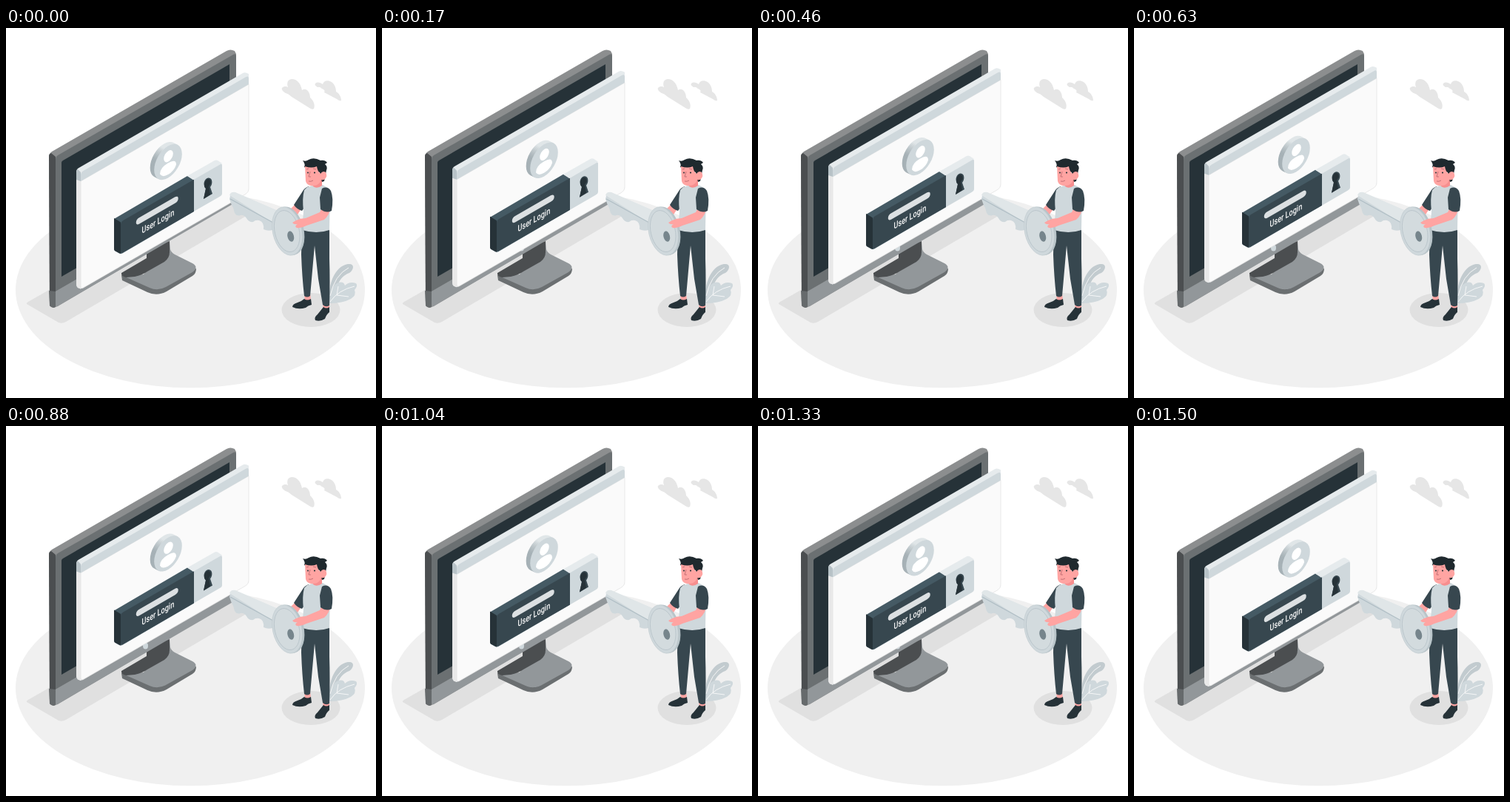
An HTML page that plays this animation: 500x500 px, repeating every 1.54 s.

```html
<!DOCTYPE html>
<html lang="en">
<head>
<meta charset="utf-8">
<title>User login</title>
<style>
html, body { margin: 0; width: 100%; height: 100%; overflow: hidden; background: #fff; }
svg { display: block; width: 100%; height: 100%; }
text { font: 500 12.5px Roboto, sans-serif; fill: #fafafa; }
.skin { fill: #ffa4a2; }
</style>
</head>
<body>
<svg viewBox="0 0 500 500">
  <linearGradient id="rim">
    <stop offset=".1" stop-color="#a6b1b6"/>
    <stop offset=".4" stop-color="#e0e6e8"/>
  </linearGradient>

  <!-- floor and shadows -->
  <ellipse cx="249" cy="354" rx="236" ry="132.300" fill="#f0f0f0"/>
  <path d="M28 373Q27 372 30 370L282 226 328 252 81 397Q76 400 71 398Z" fill="#e0e0e0"/>
  <ellipse cx="412" cy="381" rx="39.500" ry="23" fill="#e0e0e0"/>

  <g id="clouds" fill="#e6e6e6">
    <path d="M373 81C376 78 379 79 381 80C378 71 384 67 391 70C397 73 399 79 400 84C406 80 411 87 411 94C416 98 418 105 416 109Q414 111 410 108L386 93Q382 89 378 88C374 86 372 83 373 81Z"/>
    <path d="M418 75C421 72 425 74 428 76C429 71 435 70 440 73C444 76 446 81 446 86C450 88 453 93 453 98Q451 99 447 96L430 87Q432 84 427 82Q424 79 421 80Q416 77 418 75Z"/>
  </g>

  <g id="stand">
    <path d="M156 334L157 341 191 357Q204 363 217 356L252 335Q257 332 257 325L200 335Z" fill="#6b6f71"/>
    <path d="M221 288L222 299Q223 303 228 306L252 318Q261 323 252 330L216 350Q205 356 194 351L158 335 186 333Z" fill="#92979a"/>
    <path d="M156 331L190 311V300L221 288V303Q221 311 214 316L191 329Q184 334 174 336L162 337Q155 335 156 331Z" fill="#4b4e50"/>
  </g>

  <g id="monitor">
    <path d="M58 174Q58 170 62 167L298 31Q303 28 309 31L311 35V234L70 376Q63 379 59 375Z" fill="#8c8e8f"/>
    <path d="M58 173Q58 170 61 169L67 174V377Q62 379 59 375Z" fill="#4b4e50"/>
    <path d="M67 178Q67 174 70 172L307 36Q311 34 311 38V215L67 356Z" fill="#6b7072"/>
    <path d="M67 356L311 215V232Q311 235 308 237L71 375Q67 378 67 373Z" fill="#92979a"/>
    <path d="M58 355L67 356V377Q62 379 59 375Z" fill="#666a6c"/>
    <path d="M75 182Q75 180 77 179L302 49V205L75 336Z" fill="#263238"/>
    <ellipse cx="188.500" cy="297" rx="3.500" ry="4.500" fill="#cfd8dc"/>
  </g>

  <g id="panel">
    <path d="M95 195Q95 191 98 189.300L320 61Q323 59 328 62V220L101 352.500 97 351Q95 349 95 346Z" fill="#e6ebed"/>
    <path d="M95 203L101 207V352.500L97 351Q95 349 95 346Z" fill="#e9e9e9"/>
    <path d="M95 195Q95 192 97 191L101 195V207L95 205Z" fill="#b8c3c8"/>
    <g transform="matrix(1 -.577 0 1 101 195)">
      <path d="M0 12H227V153Q227 158 222 158H4Q0 158 0 154Z" fill="#fafafa" stroke="#e4e4e4" stroke-width=".7"/>
      <path d="M0 12V4Q0 0 4 0H223Q227 0 227 4V12Z" fill="#cfd8dc"/>
    </g>

    <!-- avatar -->
    <g transform="matrix(1 -.577 0 1 219 181)">
      <g fill="url(#rim)">
        <ellipse cx="-5.500" cy="-6" rx="18.800" ry="21.600"/>
        <ellipse cx="-3.700" cy="-4" rx="18.800" ry="21.600"/>
        <ellipse cx="-1.800" cy="-2" rx="18.800" ry="21.600"/>
      </g>
      <ellipse rx="18.800" ry="21.600" fill="#cfd8dc"/>
      <ellipse cx=".5" cy="-7.500" rx="6.300" ry="7.300" fill="#fff"/>
      <path d="M-11 10Q-11 1.500 0 1.500T11 10Q8 17 0 17T-11 10Z" fill="#fff"/>
    </g>

    <!-- login bar -->
    <path d="M146 258L245 200 254 205V248L158 304Q155 306 152 304L147 301Q146 300 146 298Z" fill="#455a64"/>
    <path d="M146 257L155 262.500V305L147 301Q146 300 146 298Z" fill="#263238"/>
    <path d="M245 200L282 179Q284 178 286 179L292 183 254 206Z" fill="#e6ebed"/>
    <g transform="matrix(1 -.577 0 1 155 262)">
      <path d="M0 3Q0 0 3 0H99V43H3Q0 43 0 40Z" fill="#37474f"/>
      <path d="M99 0H135Q137 0 137 3V41Q137 43 134 43H99Z" fill="#cfd8dc"/>
      <path d="M25 13H73.500" stroke="#dce0e2" stroke-width="8.500" stroke-linecap="round"/>
      <text transform="translate(28.500 32.500) scale(.73 1)">User Login</text>
    </g>
    <path d="M267.500 211C267.500 206 271 202 274 202.500C279.500 203 279.500 211 276 215L279 224 267 231 270 217Q267.500 215 267.500 211Z" fill="#37474f"/>
    <path d="M271 205C274 203 277 205 276.500 210L274 214 276 225 267 231 270 217C267 214 267.500 208 271 205Z" fill="#263238"/>
  </g>

  <g id="plant" fill="#cfd8dc">
    <path d="M437 371C435 344 445 322 462 319C472 318 470 327 464 331C453 335 446 345 441 372Z" fill="#c2cbcf"/>
    <path d="M437 372C439 358 439 350 447 345Q456 341 458 348Q464 342 473 345Q476 348 471 354Q474 361 466 366Q455 372 437 372Z"/>
    <path d="M438 362Q444 334 463 324M438 370Q449 354 471 349M447 361L463 363M447 361L449 349" fill="none" stroke="#fafafa" stroke-width=".9"/>
  </g>

  <!-- far arm -->
  <path class="skin" d="M391 238L385 244Q374 249 364 249L356 246 351 247 359 251 365 256 394 252 402 240Z"/>
  <path d="M409 214Q403 216 400 222L389 239Q393 245 400 247L409 235Z" fill="#37474f"/>

  <g id="legs">
    <path class="skin" d="M403 359L404 369 412 368 411 359ZM428 371L429 382 437 381 437 371Z"/>
    <path d="M403 366Q400 369 394 371Q387 373 387 377Q395 381 405 378Q408 375 413 374L412 366Q407 369 403 366Z" fill="#263238"/>
    <path d="M429 377Q425 382 421 387Q416 391 418 395Q425 397 431 393Q433 387 437 384L437 377Q433 380 429 377Z" fill="#263238"/>
    <path d="M400 269L399 306Q400 336 403 362Q407 365 411 362L414 328 417 294 422 339 428 374Q432 378 437 375Q438 342 437 312L437 269Z" fill="#37474f"/>
  </g>

  <g id="torso">
    <path d="M407 215L417 212H428L438 218 437 273Q420 279 400 273L402 248Q400 230 403 219Z" fill="#cfd8dc"/>
    <path d="M414 205L415 214Q420 218 427 213L427 201Z" fill="#f78f8f"/>
  </g>

  <g id="key">
    <path d="M304 223Q308 221 313 224L369 250 361 266 360 273Q354 275 348 272Q349 262 342 260Q337 259 334 262Q328 263 325 257Q321 252 317 253Q312 255 309 250L307 243Q304 238 302 231Z" fill="#cfd8dc"/>
    <path d="M302 226Q304 221 310 222L370 248 360 263Z" fill="#e0e6e8"/>
    <path d="M303 231L361 263" stroke="#b0bec5" stroke-width="1.200"/>
    <g transform="translate(380 274.500) rotate(-13)">
      <ellipse cx="3" cy=".3" rx="19.500" ry="33.200" fill="#b8c4c9"/>
      <ellipse rx="19.500" ry="33.200" fill="#cfd8dc" stroke="#c2cdd1" stroke-width=".7"/>
      <ellipse cx="-.3" rx="16.500" ry="28.500" fill="#d3dbde" stroke="#b8c4c9" stroke-width=".8"/>
      <ellipse cx="3" cy="8" rx="4.300" ry="7.300" fill="#76858c"/>
    </g>
  </g>

  <!-- near arm -->
  <path class="skin" d="M428 241L424 249 405 257Q398 257 392 260L387 263Q389 266 394 265Q389 268 393 270Q399 271 406 267L430 259Q437 253 439 242Z"/>
  <path d="M427 217Q434 213 439 220Q443 230 440 247Q433 251 425 245L424 229Z" fill="#37474f"/>

  <g id="head">
    <path d="M403 188Q405 184 401 179Q405 181 409 178Q416 174 425 179Q431 178 434 182L431 184Q435 187 433 192L430 207 427 208 424 195Z" fill="#1f292e"/>
    <path class="skin" d="M404 187Q413 190 420 187Q421 194 425 197Q428 192 432 195Q435 200 431 204Q429 206 426 205Q423 213 416 213Q407 214 405 207Z"/>
    <path d="M406 191L409 190M415 190L419 191M411 194L409 201 412 201M409 207Q412 208 415 206" fill="none" stroke="#b5626a" stroke-width=".8"/>
    <g fill="#263238"><circle cx="408" cy="195.500" r="1"/><circle cx="417" cy="195.500" r="1.100"/></g>
  </g>
</svg>
<script>
const PERIOD = 1540, LIFT = 10;
const panel = document.getElementById('panel');

function draw(now) {
  const phase = now % PERIOD / PERIOD;
  const lift = LIFT * (1 - Math.abs(1 - 2 * phase));
  panel.setAttribute('transform', `translate(0 ${-lift})`);
  requestAnimationFrame(() => draw(performance.now()));
}
draw(0);
</script>
</body>
</html>
```
